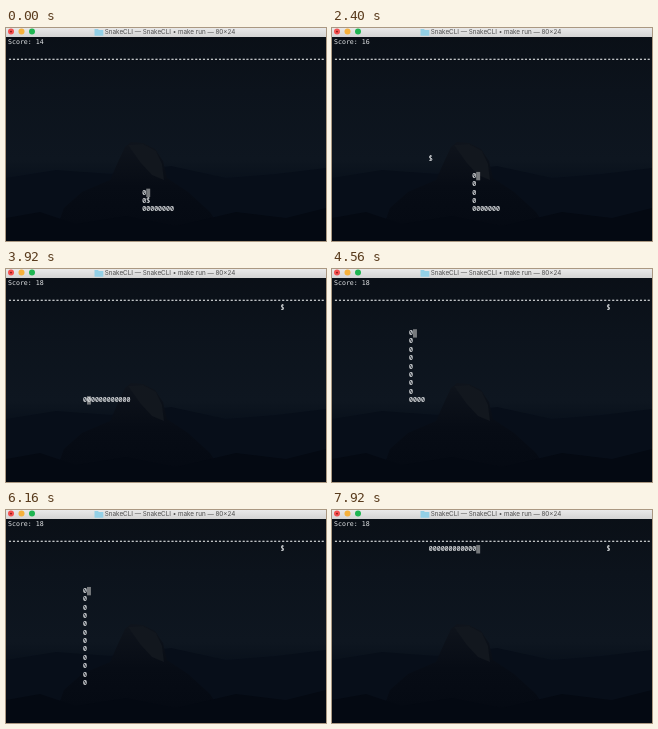
An HTML page that plays this animation: 320x213 px, repeating every 8 s.

```html
<!DOCTYPE html>
<html lang="en">
<head>
<meta charset="utf-8">
<title>Snake in a terminal</title>
<style>
  html, body { margin: 0; width: 100%; height: 100%; overflow: hidden; background: #0a0f17; }
  svg { display: block; width: 100vw; height: 100vh; }
  .term { font: 6.58px "DejaVu Sans Mono", "Noto Sans Mono", monospace; fill: #e2e4e6; white-space: pre; }
  .snake, .food { font-family: "Noto Sans Mono", "DejaVu Sans Mono", monospace; stroke: #e2e4e6; stroke-width: .18px; }
  .rule { stroke: #dcdee0; stroke-width: .45px; }
  .title { font: 6.3px Inter, "Open Sans", sans-serif; fill: #4c4c4c; }
</style>
</head>
<body>
<svg viewBox="0 0 320 213" preserveAspectRatio="none">
  <defs>
    <linearGradient id="sky" x2="0" y2="1">
      <stop offset="0" stop-color="#0a0f16"/>
      <stop offset=".3" stop-color="#0c131c"/>
      <stop offset=".62" stop-color="#0e1620"/>
      <stop offset=".72" stop-color="#08101b"/>
      <stop offset="1" stop-color="#040a14"/>
    </linearGradient>
    <linearGradient id="rock" x2="0" y2="1">
      <stop offset="0" stop-color="#0f141c"/>
      <stop offset=".45" stop-color="#070c15"/>
      <stop offset="1" stop-color="#040912"/>
    </linearGradient>
    <linearGradient id="bar" x2="0" y2="1">
      <stop offset="0" stop-color="#e9e9e9"/>
      <stop offset="1" stop-color="#d4d4d4"/>
    </linearGradient>
  </defs>

  <rect width="320" height="213" fill="url(#sky)"/>
  <path d="M0 150L50 142 105 146 165 138 220 150 270 146 320 140V213H0Z" fill="#070e19"/>
  <path d="M46 213L58 180 76 164 104 152 112 134 119 119 125 114 137 115 149 121 157 133 161 150 182 164 204 184 222 213Z" fill="url(#rock)"/>
  <path d="M122 117L137 116 150 123 156 136 158 152 146 147 134 134Z" fill="#12171e"/>
  <path d="M0 190L34 184 70 196 120 188 170 198 230 184 280 190 320 180V213H0Z" fill="#040912"/>

  <rect width="320" height="9" fill="url(#bar)"/>
  <circle cx="5" cy="3.6" r="3" fill="#f4504f"/>
  <circle cx="5" cy="3.6" r=".9" fill="#7d1512"/>
  <circle cx="15.5" cy="3.6" r="3" fill="#f6b13c"/>
  <circle cx="26" cy="3.6" r="3" fill="#1fb552"/>
  <path d="M88.5 .9h3.4l1 1h4.4v5.8h-8.8z" fill="#93d0e6"/>
  <text class="title" x="98.8" y="6.1">SnakeCLI — SnakeCLI • make run — 80×24</text>

  <g class="term" id="screen">
    <rect id="cursor" fill="#777a7d"/>
  </g>
</svg>
<script>
const CELL_W = 3.95, CELL_H = 8.37, LEFT = 2, TOP = 10;
const BASELINE = 5.9;
const FIRST_ROW = 3, ROWS = 21;
const TICK = 80, LOOP = 8000;
const START_LENGTH = 10, START_SCORE = 14;
const STALLS = [2, 3, 15, 47, 76, 78];  // ticks on which the snake does not advance
const REDRAW_TICK = 76;                 // the cursor is caught beside the food

const ROUTE = "L7 U2 U3 R8 D5 L7 U6 L16 U32 R16";
const DIRS = { L: [-1, 0], R: [1, 0], U: [0, -1], D: [0, 1] };
const FOODS = [[35, 19], [24, 14], [69, 3]];
const MEALS = [24, 40];

const screen = document.getElementById("screen");
const cursor = document.getElementById("cursor");

const colX = col => LEFT + col * CELL_W;
const rowY = row => TOP + row * CELL_H;

function addText(name, text = "", col = 0, row = 0) {
  const el = document.createElementNS("http://www.w3.org/2000/svg", "text");
  el.setAttribute("class", name);
  el.textContent = text;
  screen.append(el);
  place(el, col, row);
  return el;
}

function place(el, col, row) {
  el.setAttribute("x", colX(col));
  el.setAttribute("y", rowY(row) + BASELINE);
}

function buildTrail() {
  let x = 41, y = 20;
  const trail = [[x, y]];
  for (const leg of ROUTE.split(" ")) {
    const [dx, dy] = DIRS[leg[0]];
    for (let i = 0; i < +leg.slice(1); i++) {
      x += dx;
      y = FIRST_ROW + (y + dy - FIRST_ROW + ROWS) % ROWS;
      trail.push([x, y]);
    }
  }
  return trail;
}

const trail = buildTrail();
const score = addText("score");
addText("rule", "-".repeat(80), 0, 2);
const food = addText("food", "$");
const body = Array.from({ length: START_LENGTH + MEALS.length }, () => addText("snake", "0"));
cursor.setAttribute("width", CELL_W);
cursor.setAttribute("height", CELL_H);

function draw(time) {
  const tick = Math.floor(time % LOOP / TICK);
  const moves = tick - STALLS.filter(s => s <= tick).length;
  const eaten = MEALS.filter(m => m <= moves).length;
  const head = START_LENGTH - 1 + moves;

  score.textContent = "Score: " + (START_SCORE + 2 * eaten);
  place(food, ...FOODS[eaten]);
  body.forEach((el, i) => {
    const shown = i < START_LENGTH + eaten;
    el.style.display = shown ? "" : "none";
    if (shown) place(el, ...trail[head - i]);
  });

  const [col, row] = tick === REDRAW_TICK ? FOODS[eaten] : trail[head];
  cursor.setAttribute("x", colX(col + 1));
  cursor.setAttribute("y", rowY(row));
}

let start;
function frame(now) {
  start ??= now;
  draw(now - start);
  requestAnimationFrame(frame);
}
draw(0);
requestAnimationFrame(frame);
</script>
</body>
</html>
```
